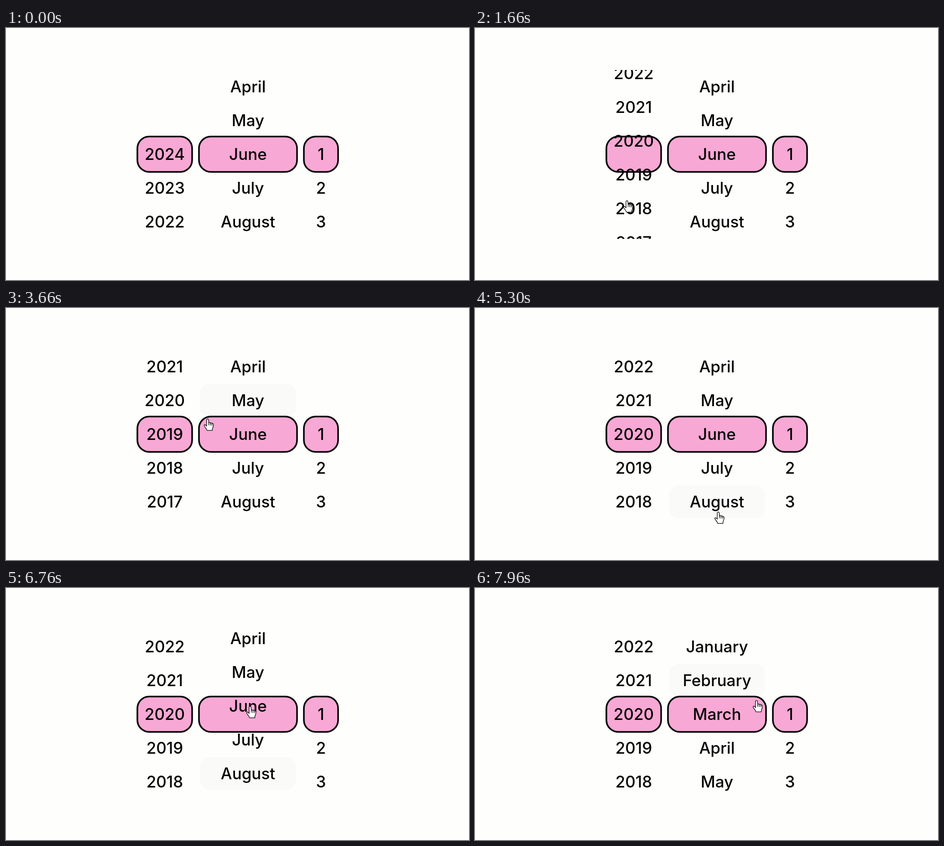
These frames come from a looping animation (1015x552 px, 8000 ms). An HTML page with a canvas:

```html
<!DOCTYPE html>
<html lang="en">
<head>
<meta charset="utf-8">
<title>Date picker</title>
<style>
  html, body { margin: 0; width: 100%; height: 100%; overflow: hidden; background: #fefefc; }
  canvas { display: block; }
</style>
</head>
<body>
<canvas id="stage" width="1015" height="552"></canvas>
<script>
const ctx = document.getElementById('stage').getContext('2d');
const LOOP = 8000, ROW = 74, MIDDLE = 277;
const INK = '#050505', PINK = '#f8a8d4', HOVER = '#fafaf9', PAPER = '#fefefc';

const count = (length, label) => Array.from({ length }, (_, i) => label(i));
const monthName = i => new Date(2024, i, 1).toLocaleString('en', { month: 'long' });

const columns = [
  { x: 290, width: 116, items: count(25, i => String(2024 - i)), scroll: yearScroll },
  { x: 425, width: 211, items: count(12, monthName), scroll: monthScroll },
  { x: 655, width: 71, items: count(31, i => String(i + 1)), scroll: () => 0 }
];

// Straight pointer moves; each starts where the previous one ended.
const entry = { x: 45, y: 63 };
const moves = [
  { from: 200, to: 330, x: 184, y: 120 },
  { from: 630, to: 930, x: 333, y: 378 },
  { from: 1950, to: 2150, x: 347, y: 187 },
  { from: 3000, to: 3400, x: 548, y: 230 },
  { from: 3400, to: 3660, x: 442, y: 243 },
  { from: 3660, to: 4060, x: 362, y: 189 },
  { from: 4600, to: 5030, x: 564, y: 468 },
  { from: 5030, to: 5460, x: 515, y: 434 },
  { from: 5850, to: 6100, x: 535, y: 259 },
  { from: 7150, to: 7500, x: 531, y: 156 },
  { from: 7660, to: 7960, x: 617, y: 246 }
];

const arrow = new Path2D('M0 0V19L4.3 15 7.4 21.5 10.6 20.1 7.7 13.8H13.8Z');
const hand = new Path2D('M-2 16V2.4C-2-.4 2.1-.4 2.2 2.4L2.7 9C3 7.3 6 7.4 6.3 9.5' +
  'C6.8 8.2 9.4 8.4 9.7 10.6C10.4 9.4 12.8 9.8 12.9 12.2C13.1 17 12 19 10.8 21.5' +
  'L10.4 25.3H-1C-1.8 22-5 19-7 15.6C-8.3 13.2-5.6 11.9-4 13.6Z');
const fingers = new Path2D('M2.7 9V14M6.3 9.5V14.4M9.7 10.6V14.8');

const progress = (t, start, end) => Math.min(1, Math.max(0, (t - start) / (end - start)));
const easeOut = (t, start, end) => Math.sin(progress(t, start, end) * Math.PI / 2);

// A long fling with friction, then shorter scrolls back.
function yearScroll(t) {
  const fling = Math.min(7, 7.12 * (1 - Math.exp(-Math.max(0, t - 1300) / 375)));
  return ROW * (fling - 2 * easeOut(t, 2900, 3450) - easeOut(t, 4230, 4700));
}

function monthScroll(t) {
  return ROW * (5 + 2 * easeOut(t, 5700, 6040) - 4 * easeOut(t, 6530, 7330)
    - easeOut(t, 7660, 7940));
}

function pointerAt(t) {
  const index = moves.findLastIndex(move => move.from <= t);
  if (index < 0) return null;
  const start = moves[index - 1] || entry, end = moves[index];
  const p = progress(t, end.from, end.to);
  return {
    x: start.x + (end.x - start.x) * p,
    y: start.y + (end.y - start.y) * p,
    movedAt: Math.min(t, end.to)
  };
}

// Hover changes only while the pointer moves, so it travels along with a scroll.
function hoveredIndex({ x, width, scroll }, pointer) {
  if (!pointer || pointer.x < x || pointer.x > x + width) return -1;
  return Math.round((pointer.y - 7 - MIDDLE + scroll(pointer.movedAt)) / ROW);
}

function roundedRect(x, y, w, h, r) {
  ctx.beginPath();
  ctx.roundRect(x, y, w, h, r);
}

function drawColumn(column, t, pointer) {
  const { x, width, items } = column;
  const scroll = column.scroll(t), hovered = hoveredIndex(column, pointer);
  const rowY = i => MIDDLE + i * ROW - scroll;
  ctx.save();
  ctx.beginPath();
  ctx.rect(x - 6, 92, width + 12, 370);
  ctx.clip();

  if (hovered in items) {
    roundedRect(x, rowY(hovered) - 37, width, 73, 22);
    ctx.fillStyle = HOVER;
    ctx.fill();
  }

  roundedRect(x - 2, 237.7, width + 4, 77.5, 26);
  ctx.fillStyle = PINK;
  ctx.fill();
  ctx.strokeStyle = INK;
  ctx.lineWidth = 3.6;
  ctx.stroke();

  ctx.fillStyle = INK;
  items.forEach((label, i) => ctx.fillText(label, x + width / 2, rowY(i) + 12.2));
  ctx.restore();
}

function drawPointer({ x, y }) {
  ctx.save();
  ctx.translate(x, y);
  ctx.lineJoin = 'round';
  if (x < columns[0].x) {
    ctx.strokeStyle = '#fff';
    ctx.lineWidth = 2;
    ctx.stroke(arrow);
    ctx.fillStyle = '#000';
    ctx.fill(arrow);
  } else {
    ctx.fillStyle = '#fff';
    ctx.fill(hand);
    ctx.strokeStyle = '#000';
    ctx.lineWidth = 1.3;
    ctx.stroke(hand);
    ctx.stroke(fingers);
  }
  ctx.restore();
}

function draw(t) {
  ctx.fillStyle = PAPER;
  ctx.fillRect(0, 0, 1015, 552);
  ctx.font = '500 35px Inter, sans-serif';
  ctx.textAlign = 'center';
  const pointer = pointerAt(t);
  columns.forEach(column => drawColumn(column, t, pointer));
  if (pointer) drawPointer(pointer);
}

const start = performance.now();
function tick() {
  draw((performance.now() - start) % LOOP);
  requestAnimationFrame(tick);
}
tick();
</script>
</body>
</html>
```
